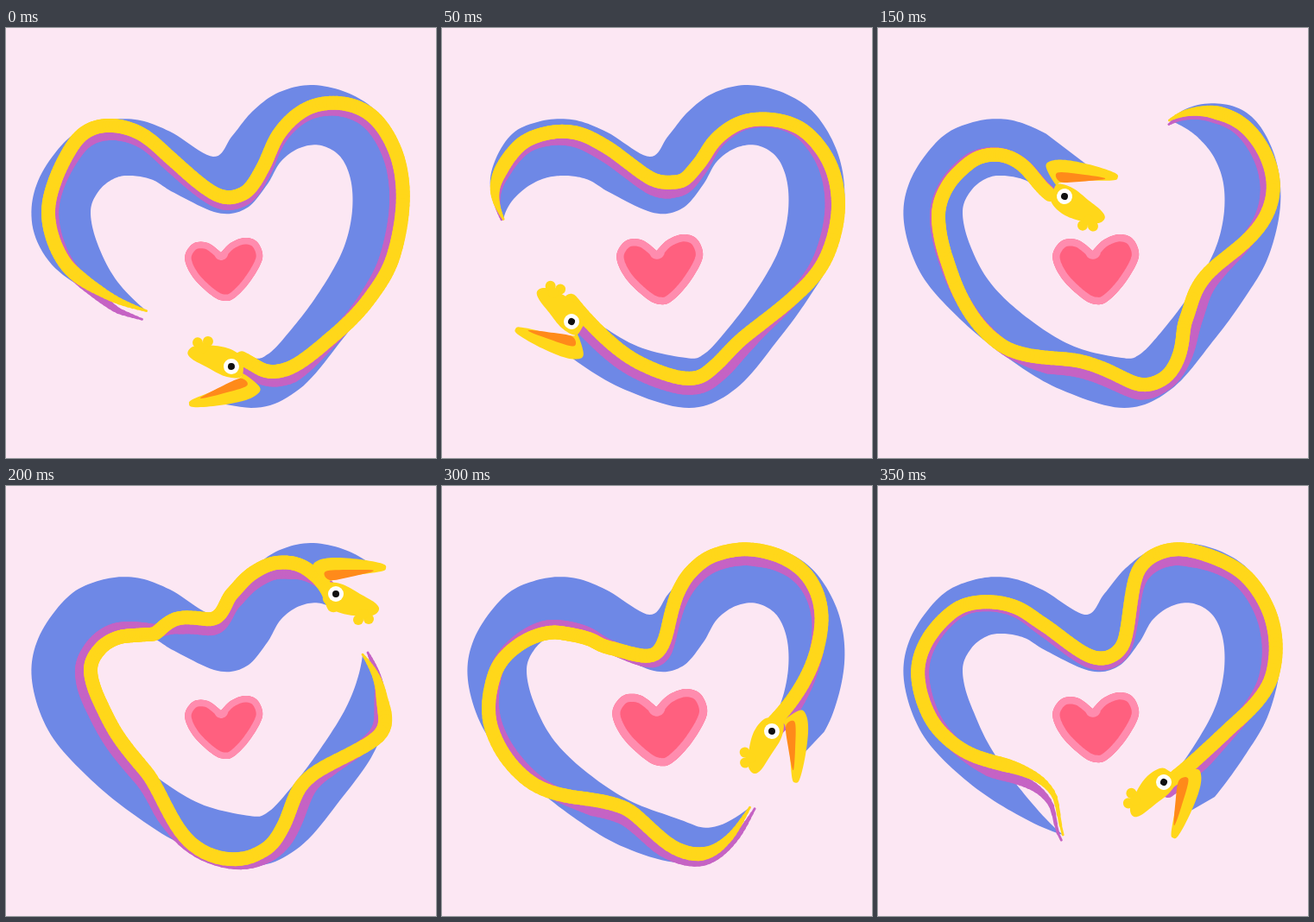
Animation of 498 by 498 pixels, one loop 400 ms. Source, as an HTML page with a canvas:

```html
<!DOCTYPE html>
<html lang="en">
<head>
<meta charset="utf-8">
<title>Eel heart</title>
<style>
html, body { margin: 0; width: 100%; height: 100%; overflow: hidden; background: #fce7f3; }
canvas { display: block; width: 100%; height: 100%; }
</style>
</head>
<body>
<canvas id="stage" width="498" height="498"></canvas>
<script>
const ctx = document.getElementById('stage').getContext('2d');
const STEP = 50;
const COLOR = { back: '#fce7f3', blue: '#6e88e6', plum: '#c563c4', yellow: '#ffd71a',
                orange: '#ff8a1a', pink: '#ff8cae', red: '#ff607f' };

// The heart-shaped track, clockwise from the bottom: outer x, y and inner x, y.
const TRACK = [
  [285,440, 282,382], [210,418, 225,368], [150,382, 172,335], [95,337, 130,295],
  [50,285, 106,250], [30,225, 98,212], [38,175, 108,188], [72,128, 126,174],
  [110,109, 145,171], [150,106, 170,176], [190,120, 195,191], [240,149, 245,214],
  [262,125, 278,209], [285,97, 302,182], [315,75, 318,155], [355,66, 340,139],
  [400,77, 365,136], [435,103, 388,150], [460,150, 400,180], [466,205, 400,220],
  [452,265, 388,262], [425,312, 360,310], [390,360, 328,352], [340,418, 303,378]
];

// head: eye x, eye y, turn of the snout, turn of the jaw in degrees.
// wave: where the stripe bends, from tail to head, as [place on the track, 0 inner to 1 outer edge].
const POSES = [
  { head: [261,392,178,166],
    wave: [[2.2,0], [3,.35], [4,.66], [6,.74], [8,.93], [12.2,.2], [16.3,.85], [19,.9], [21.5,.9], [24.2,.03]] },
  { head: [150,340,202,200],
    wave: [[4.9,.4], [6,.65], [8,.78], [10.5,.7], [12.5,.3], [15.5,.45], [18.5,.86], [20.5,.85], [22.3,.35], [24.3,.4], [26.5,0]] },
  { head: [87,210,232,230],
    wave: [[8,.45], [9,.62], [11,.95], [13,.33], [14.5,.04], [16,0], [17.6,.53], [19.5,.85], [20.3,.83], [21.6,.12], [22.4,0], [25.2,.77], [27,.42], [29.4,0]] },
  { head: [216,195,369,368],
    wave: [[14.7,.47], [16.2,.68], [18.3,.88], [19.2,.75], [20.5,.08], [21.6,.25], [22.9,.72], [24.7,.25], [26.2,.85], [28,.48], [30.5,.38], [32.5,.36], [34.1,0]] },
  { head: [382,125,360,360],
    wave: [[18.5,.18], [19.6,.62], [20.5,.88], [21.5,.2], [22.2,.2], [23.7,.7], [24.8,.95], [26.2,.05], [29,0], [33,.06], [34.8,.88], [36.2,1], [38.4,.75], [40.5,.05]] },
  { head: [410,200,415,415],
    wave: [[20.8,.55], [22.3,.62], [24,.7], [25.3,.4], [26.6,.6], [28.3,.55], [31.5,.03], [33.5,.05], [35.5,.8], [37.5,.95], [40,.8], [42.4,.1]] },
  { head: [382,284,453,453],
    wave: [[22.3,.65], [23.4,.8], [24.2,.68], [25.2,.2], [26.8,.97], [28,.87], [29,.55], [31,.08], [33.5,0], [35,.28], [36.4,.88], [39,.9], [41.2,.82], [42.5,.52], [44.4,-.02]] },
  { head: [331,343,472,468],
    wave: [[25,.72], [25.4,0], [26.1,-.03], [27.3,.58], [28.3,.75], [30.5,.7], [34,.42], [36.3,.2], [37.6,.85], [40,.86], [43.2,.88], [44.4,.42], [46,-.05]] }
];

// Outlines relative to the eye or to the middle of the heart.
const HEART = [[-3,-19], [-3,-19], [8,-30], [24,-36], [38,-32], [45,-18], [42,-4], [28,18], [12,34], [1,37], [-12,32], [-32,14], [-43,-4], [-44,-18], [-34,-30], [-18,-30]];
const SNOUT = [[-10,-13], [8,-11], [28,0], [45,10], [50,18], [42,25], [20,25], [0,20], [-14,9], [-14,-2]];
const JAW = [[-26,-31], [-20,-39], [-2,-42], [28,-40], [54,-35], [58,-30], [52,-26], [18,-21], [-7,-15], [-12,-12]];
const TONGUE = [[-12,-26], [16,-28], [44,-27], [18,-20], [-7,-16]];

// Catmull-Rom point on a closed curve.
function onLoop(points, u) {
  const i = Math.floor(u), t = u - i, count = points.length;
  const [p, q, r, s] = [-1, 0, 1, 2].map(k => points[(i + k + count) % count]);
  return q.map((b, k) => b + 0.5 * t * (r[k] - p[k] + t * (2 * p[k] - 5 * b + 4 * r[k] - s[k]
    + t * (3 * (b - r[k]) + s[k] - p[k]))));
}

// Smooth curve through unevenly spaced [u, v] keys.
function waveAt(keys, u) {
  const last = keys.length - 1;
  let i = 0;
  while (i < last - 1 && u > keys[i + 1][0]) i++;
  const slope = k => {
    const a = keys[Math.max(0, k - 1)], b = keys[Math.min(last, k + 1)];
    return (b[1] - a[1]) / (b[0] - a[0]);
  };
  const [u0, v0] = keys[i], [u1, v1] = keys[i + 1], span = u1 - u0, t = (u - u0) / span;
  const ease = t * t * (3 - 2 * t);
  return v0 + (v1 - v0) * ease + span * t * (1 - t) * ((1 - t) * slope(i) - t * slope(i + 1));
}

// Point across the track at v, moved outward by a distance in pixels.
function place(u, v, shift = 0) {
  const [ox, oy, ix, iy] = onLoop(TRACK, u);
  const f = v + shift / Math.hypot(ox - ix, oy - iy);
  return [ix + (ox - ix) * f, iy + (oy - iy) * f];
}

function fill(points, color) {
  ctx.beginPath();
  for (const [x, y] of points) ctx.lineTo(x, y);
  ctx.closePath();
  ctx.fillStyle = color;
  ctx.fill();
}

function blob(points, color) {
  const samples = Array.from({ length: points.length * 8 }, (_, i) => onLoop(points, i / 8));
  fill(samples, color);
}

function disc(x, y, radius, color) {
  ctx.beginPath();
  ctx.arc(x, y, radius, 0, 2 * Math.PI);
  ctx.fillStyle = color;
  ctx.fill();
}

function placed(x, y, degrees, scale, paint) {
  ctx.save();
  ctx.translate(x, y);
  ctx.rotate(degrees * Math.PI / 180);
  ctx.scale(scale, scale);
  paint();
  ctx.restore();
}

function ribbon(steps, pointAt, color) {
  ctx.strokeStyle = color;
  ctx.lineCap = 'round';
  for (let i = 1; i < steps.length; i++) {
    ctx.beginPath();
    ctx.moveTo(...pointAt(steps[i - 1]));
    ctx.lineTo(...pointAt(steps[i]));
    ctx.lineWidth = 2 + 14 * Math.min(1, (steps[i] - steps[0]) / 1.5);
    ctx.stroke();
  }
}

function drawBody({ head: [x, y, , jawTurn], wave }) {
  const [tail, tailV] = wave[0], end = wave[wave.length - 1][0];
  const steps = Array.from({ length: 241 }, (_, i) => tail + (end - tail) * i / 240);
  const edge = side => steps.map(u => {
    const grown = Math.sin(Math.min(1, (u - tail) / 2.8) * Math.PI / 2);
    return place(u, tailV + (side - tailV) * grown);
  });
  const angle = jawTurn * Math.PI / 180, cos = Math.cos(angle), sin = Math.sin(angle);
  const throat = [[24, -38], [-12, -22], [-8, -8]].map(([a, b]) => [x + a * cos - b * sin, y + a * sin + b * cos]);
  fill([...edge(1), ...throat, ...edge(0).reverse()], COLOR.blue);

  // The fin leans to the middle of the body and hangs down at the notch and the bottom.
  const lean = (u, v) => Math.max(-11, Math.min(11, 20 * (0.5 - v) + 12 * Math.cos(u * Math.PI / 12) ** 3));
  ribbon(steps, u => place(u, waveAt(wave, u), lean(u, waveAt(wave, u))), COLOR.plum);
  ribbon(steps, u => place(u, waveAt(wave, u)), COLOR.yellow);
}

function drawHead([x, y, turn, jawTurn]) {
  placed(x, y, jawTurn, 1, () => {
    blob(JAW, COLOR.yellow);
    blob(TONGUE, COLOR.orange);
  });
  placed(x, y, turn, 1, () => {
    blob(SNOUT, COLOR.yellow);
    for (const [cx, cy] of [[38, 29], [26, 30], [32, 23]]) disc(cx, cy, 6, COLOR.yellow);
    disc(0, 0, 9, '#fff');
    disc(0, 0, 4, '#111');
  });
}

function drawHeart(scale) {
  placed(252, 279, 0, scale, () => {
    blob(HEART, COLOR.red);
    ctx.clip();
    ctx.strokeStyle = COLOR.pink;
    ctx.lineWidth = 15;
    ctx.lineJoin = 'round';
    ctx.stroke();
  });
}

function draw(index) {
  ctx.fillStyle = COLOR.back;
  ctx.fillRect(0, 0, 498, 498);
  drawBody(POSES[index]);
  drawHead(POSES[index].head);
  drawHeart(1.11 - 0.11 * Math.cos(index * Math.PI / 2));
}

const start = performance.now();
function tick() {
  const elapsed = performance.now() - start;
  draw(Math.floor(elapsed / STEP) % POSES.length);
  requestAnimationFrame(tick);
}
tick();
</script>
</body>
</html>
```
